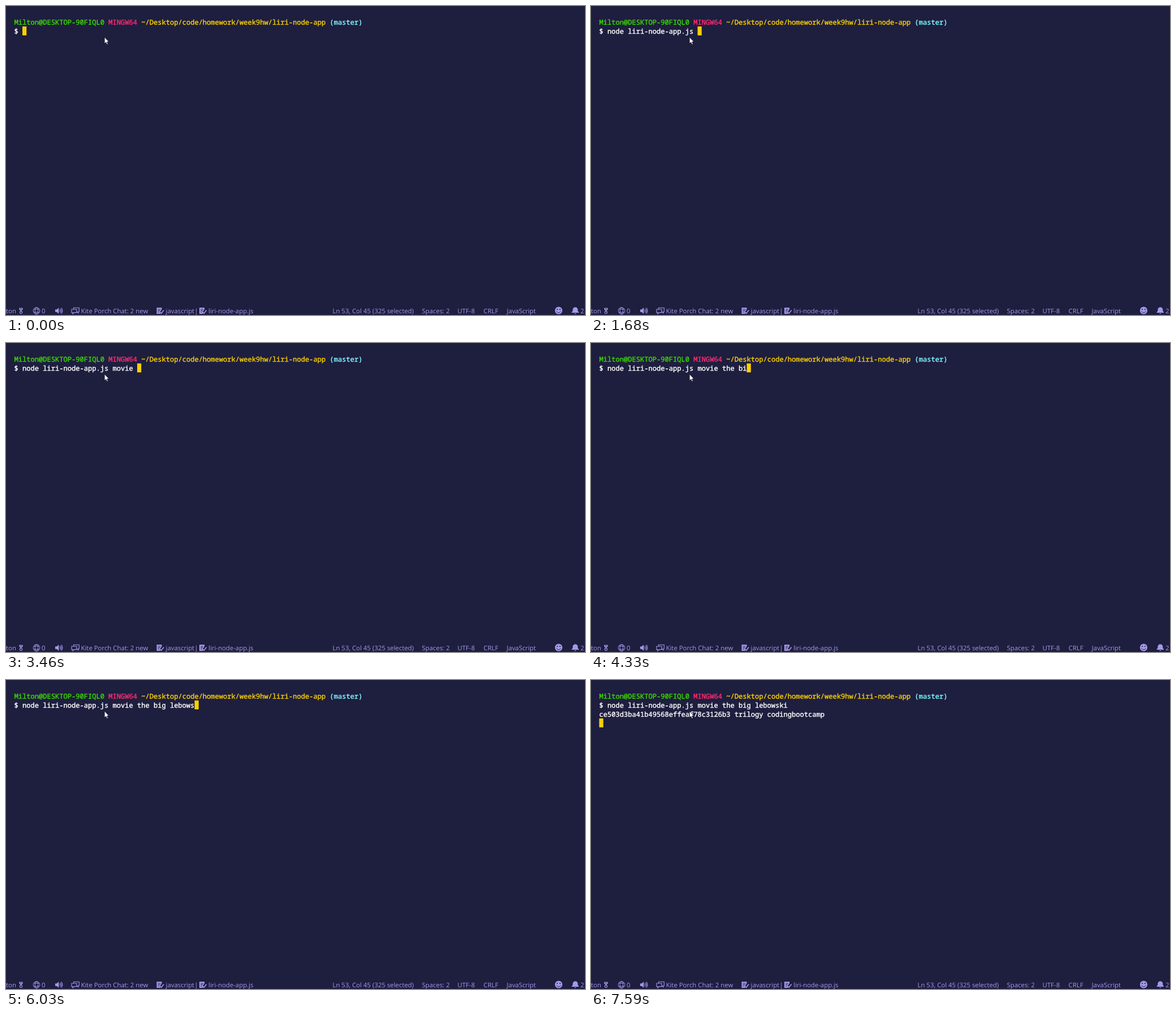
An HTML page for the animation above (8 s loop, 1024 by 547 pixels).

```html
<!DOCTYPE html>
<html lang="en">
<head>
<meta charset="utf-8">
<title>Terminal session</title>
<style>
  html, body { margin: 0; width: 100%; height: 100%; overflow: hidden; background: #1e1e3f; }
  svg { display: block; width: 1024px; height: 547px; }
  text { white-space: pre; text-rendering: geometricPrecision; }
  .term { font: 12.08px "Noto Sans Mono", monospace; color: #fff; }
  .term text, .term tspan { fill: currentColor; stroke: currentColor; stroke-width: .4; }
  .user { color: #3ad900; }
  .system { color: #ff2c70; }
  .path { color: #fad000; }
  .branch { color: #80fcff; }
  .status { font: 11.4px "Open Sans", sans-serif; fill: #a599e9; }
  .line { fill: none; stroke: #a599e9; stroke-width: 1.1; }
  .cut { fill: none; stroke: #1e1e3f; stroke-width: 1; }
</style>
</head>
<body>
<svg viewBox="0 0 1024 547">
  <defs>
    <g id="file">
      <path d="M0 0H9V3L6 7.5V11H0Z"/>
      <path class="cut" d="M2 3H7M2 5.5H6M2 8H4.5"/>
      <path class="line" style="stroke-width: 1.7" d="M6 8L8 10.2L12.6 4.5"/>
    </g>
  </defs>

  <g class="term">
    <text x="14.5" y="33"><tspan class="user">Milton@DESKTOP-90FIQL0</tspan> <tspan class="system">MINGW64</tspan> <tspan class="path">~/Desktop/code/homework/week9hw/liri-node-app</tspan> <tspan class="branch">(master)</tspan></text>
    <text id="command" x="14.5" y="48.8"></text>
    <text id="output" x="14.5" y="64.6">ce503d3ba41b49568effeaf78c3126b3 trilogy codingbootcamp</text>
    <rect id="cursor" width="7.25" height="15.8" fill="#fad000"/>
  </g>

  <g class="status">
    <text x="18" y="543.6" text-anchor="end">Milton</text>
    <text x="63" y="543.6">0</text>
    <text x="132.5" y="543.6">Kite Porch Chat: 2 new</text>
    <text x="282.5" y="543.6">javascript</text>
    <text x="333.2" y="543.6">|</text>
    <text x="358" y="543.6">liri-node-app.js</text>
    <text x="577.5" y="543.6">Ln 53, Col 45 (325 selected)</text>
    <text x="735.5" y="543.6">Spaces: 2</text>
    <text x="798.5" y="543.6">UTF-8</text>
    <text x="844.5" y="543.6">CRLF</text>
    <text x="885.5" y="543.6">JavaScript</text>
    <text x="1016" y="543.6">2</text>

    <!-- medal -->
    <path d="M23.5 534.5H29.5V537.5L26.5 540L23.5 537.5Z"/>
    <path class="cut" d="M26.5 534.5V538"/>
    <circle class="line" cx="26.5" cy="542.2" r="2.1"/>
    <!-- globe -->
    <g class="line" style="stroke-width: 1">
      <circle cx="54" cy="539.5" r="5.8"/>
      <ellipse cx="54" cy="539.5" rx="2.8" ry="5.8"/>
      <path d="M49 536.8H59M49 542.2H59"/>
    </g>
    <!-- speaker -->
    <path d="M87 537.3H89.7L93.3 534V545L89.7 541.7H87Z"/>
    <path class="line" d="M94.8 537.4Q96.4 539.5 94.8 541.6M96.4 535.8Q99 539.5 96.4 543.2M98 534.3Q101.6 539.5 98 544.7"/>
    <!-- chat -->
    <path class="line" d="M119.5 537V534.2H129.3V541.2H128V543.6L125.5 541.2M116 537H125V542.6H120.5L118 545V542.6H116Z"/>
    <use href="#file" x="266.5" y="534"/>
    <use href="#file" x="342" y="534"/>
    <!-- smiley -->
    <circle cx="977.4" cy="539" r="6.6"/>
    <g fill="#1e1e3f">
      <circle cx="975" cy="537" r="1.1"/>
      <circle cx="979.8" cy="537" r="1.1"/>
    </g>
    <path class="cut" d="M973.4 540.5Q977.4 545.6 981.4 540.5"/>
    <!-- bell -->
    <path d="M1000.5 543V542L1002.3 540V537.5Q1002.8 533.5 1006.8 533.3Q1010.8 533.5 1011.3 537.5V540L1013 542V543ZM1005 544H1008.6Q1006.8 546.6 1005 544Z"/>
  </g>

  <path fill="#fff" stroke="#15152c" stroke-width=".8" d="M174.2 55V66.6L176.8 64.3L178.6 68.2L180.4 67.4L178.7 63.6H182Z"/>
</svg>
<script>
  const LOOP = 8000, ENTER = 7360, REPLY = 7590;
  const LEFT = 14.5, ADVANCE = 7.25, TOP = 36.2, PITCH = 15.9;

  // Each keystroke: time in ms, inserted text; "\b" deletes one character.
  const keys = [
    [520, "n"], [680, "o"], [830, "d"], [990, "e"], [1300, " "], [1370, "l"],
    [1680, "iri-node-app.js "],
    [2690, "m"], [2770, "o"], [2940, "v"], [3110, "i"], [3290, "e"], [3460, " "],
    [3780, "t"], [3920, "h"], [4060, "e "], [4190, "b"], [4330, "i"], [4570, "g"], [4720, " "],
    [4890, "l"], [5110, "e"], [5340, "b"],
    [5650, "o"], [5830, "w"], [6000, "s"], [6180, "i"],
    [6730, "\b"], [6900, "k"], [6980, "i"]
  ];

  const [command, output, cursor] =
    ["command", "output", "cursor"].map(id => document.getElementById(id));

  function commandAt(time) {
    return keys.filter(([at]) => at <= time)
      .reduce((text, [, key]) => key === "\b" ? text.slice(0, -1) : text + key, "$ ");
  }

  function draw(now) {
    const time = now % LOOP;
    const text = commandAt(time);
    const row = time >= REPLY ? 2 : time >= ENTER ? 1 : 0;
    command.textContent = text;
    output.style.display = row === 2 ? "" : "none";
    cursor.setAttribute("x", LEFT + (row ? 0 : text.length * ADVANCE));
    cursor.setAttribute("y", TOP + row * PITCH);
  }

  const start = performance.now();
  function tick() {
    draw(performance.now() - start);
    requestAnimationFrame(tick);
  }
  tick();
</script>
</body>
</html>
```
